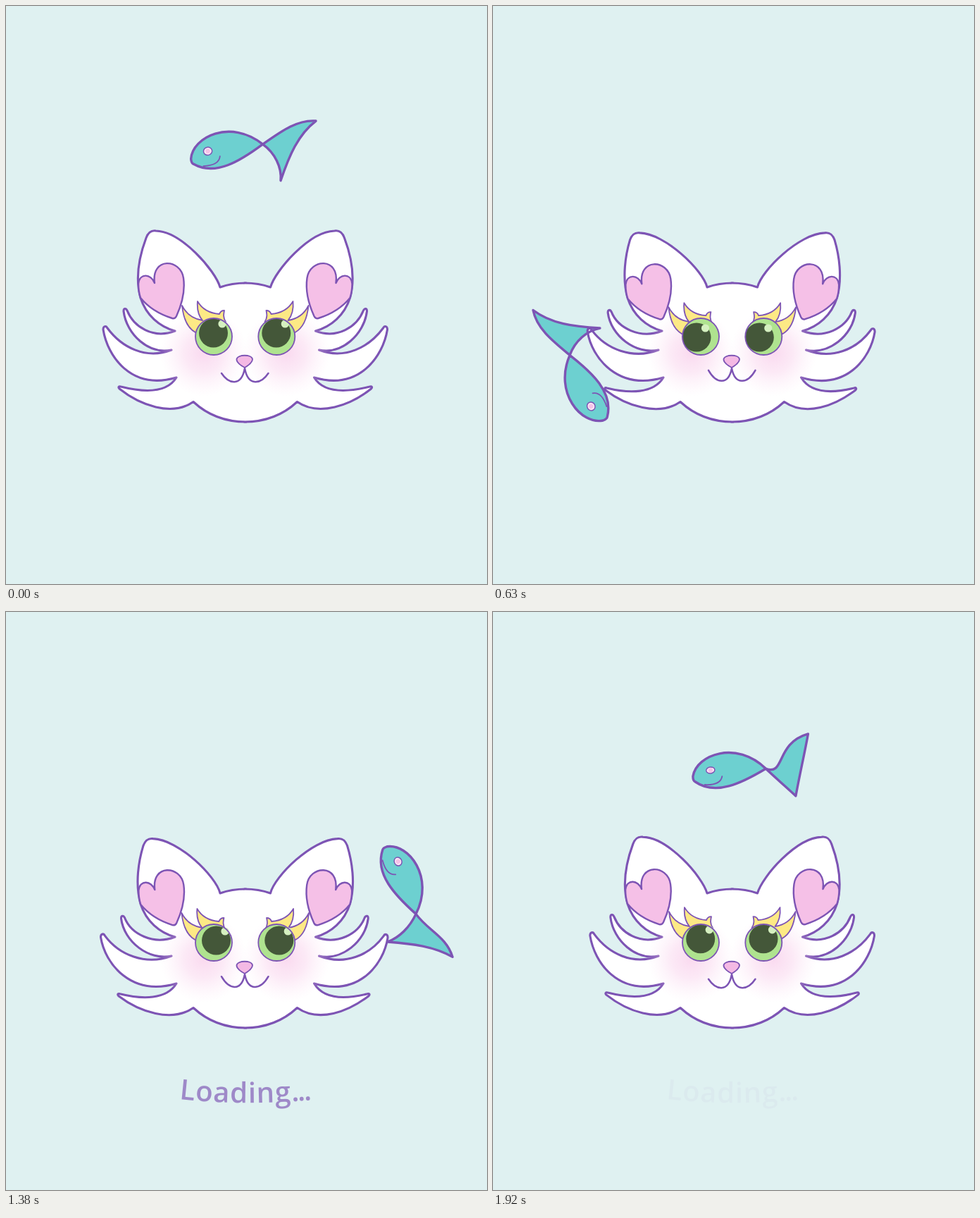
An HTML page for the animation above (1.95 s loop, 683x820 px).

```html
<!DOCTYPE html>
<html lang="en">
<head>
<meta charset="utf-8">
<title>Loading cat</title>
<style>
  html, body { margin: 0; width: 100%; height: 100%; overflow: hidden; background: #dff1f1; }
  svg { display: block; width: 100vw; height: 100vh; }
  .line { fill: none; stroke: #7d54b4; stroke-width: 3.4; stroke-linecap: round; stroke-linejoin: round; }
  .thin { stroke-width: 1.8; }
  .coat { fill: #fff; stroke-width: 3.1; }
  .heart { fill: #f5c0e7; stroke-width: 2.4; }
  .lash { fill: #fde985; }
  .teal { fill: #6dd0d0; }
  text { font: 600 40px "Open Sans", "Noto Sans", sans-serif; letter-spacing: 1px; fill: url(#reveal); }
  .dots { letter-spacing: -2px; }
</style>
</head>
<body>
<svg viewBox="0 0 683 820">
  <defs>
    <linearGradient id="reveal" gradientUnits="userSpaceOnUse" x1="0" y1="0" x2="75" y2="0">
      <stop offset="0" stop-color="#7d54b4"/>
      <stop offset="1" stop-color="#7d54b4" stop-opacity="0"/>
    </linearGradient>
    <radialGradient id="blush">
      <stop offset="0" stop-color="#f8cdea" stop-opacity=".75"/>
      <stop offset=".45" stop-color="#f9d4ed" stop-opacity=".5"/>
      <stop offset="1" stop-color="#fce6f5" stop-opacity="0"/>
    </radialGradient>
    <path id="baseline" d="M246 691Q343 702 455 690"/>
    <path id="body" d="M-52 -3C-43 -33 16 -46 52 0C15 16 -24 29 -50 5Q-53 3 -52 -3Z"/>
    <path id="tail"/>
    <path id="heart" d="M211 393C206 380 190 378 188 394C188 401 189 408 191 414C204 430 220 438 236 443Q240 444 242 440C252 418 254 400 252 386C248 358 206 356 211 393Z"/>
    <path id="lash" d="M250 425C252 445 258 457 269 463L312 448C308 442 309 437 310 432C307 432 304 434 303 437C290 436 279 431 272 419C271 430 274 440 279 446C266 444 256 437 250 425Z"/>
    <g id="eye">
      <circle cx="295" cy="469" r="26" fill="#afe38f"/>
      <g id="pupil">
        <circle cx="295" cy="469" r="20.5" fill="#445739"/>
        <circle cx="307.5" cy="456" r="5.6" fill="#d5f0c0"/>
      </g>
      <circle class="line thin" cx="295" cy="469" r="26"/>
    </g>
  </defs>

  <text id="label"><textPath href="#baseline">Loading<tspan class="dots">...</tspan></textPath></text>

  <g class="fish teal"><use href="#tail"/><use href="#body"/></g>

  <g id="cat">
    <path id="left" class="line coat"/>
    <path id="right" class="line coat" transform="translate(679.5) scale(-1 1)"/>
    <circle cx="281" cy="492" r="62" fill="url(#blush)"/>
    <circle cx="398" cy="492" r="62" fill="url(#blush)"/>
    <g class="line heart">
      <use class="ear" href="#heart"/>
      <g transform="translate(679.5) scale(-1 1)"><use class="ear" href="#heart"/></g>
    </g>
    <g class="line thin lash">
      <use class="brow" href="#lash"/>
      <g transform="translate(679.5) scale(-1 1)"><use class="brow" href="#lash"/></g>
    </g>
    <use href="#eye"/>
    <use href="#eye" x="89.3"/>
    <path id="mouth" class="line" style="stroke-width:2.5"/>
    <path class="line thin" style="fill:#f4b9e4" d="M339 513C333 510 327 505 327.5 501C329 494 349 494 350 501C350 505 344 510 339 513Z"/>
  </g>

  <g class="fish line">
    <use href="#tail"/><use href="#body"/>
    <path class="thin" d="M-11 2.6Q-15 15 -37 11"/>
    <ellipse id="fishEye" class="thin" cx="-26.2" cy="-8.3" rx="6.1" style="fill:#fdeaf7;stroke-width:1.5"/>
    <circle cx="-26.2" cy="-8.3" r="3.3" fill="#f6c3e8" stroke="none"/>
  </g>
</svg>

<script>
const LOOP = 1950, STEP = 30;
const $ = id => document.getElementById(id);
const all = sel => document.querySelectorAll(sel);
const clamp = v => Math.min(1, Math.max(0, v));

// time, angle round the cat, radius, heading
const swim = [
  [0, 7.4, 241, 13.2], [210, 40.8, 230, 43.4], [540, 96, 229, 99.5],
  [630, 114, 231, 118.7], [690, 129, 239, 133.8], [900, 193, 242.5, 200],
  [1080, 230, 240, 236], [1380, 287, 225, 294.9], [1620, 325.4, 227, 331],
  [1710, 334.7, 206, 340.9], [1920, 362.4, 218, 367.6]
];
// time, pupil offset
const gaze = [
  [0, -.5, -5], [210, -2.5, -4], [630, -6, 1], [900, 0, 6],
  [1130, 4.3, 1.8], [1380, 3.5, -3], [1710, 1, -6], [1950, -.5, -5]
];
const tailBent = "M52 0C82 -12 108 -23 133 -15C104 -2 85 24 65 56C71 38 66 16 52 0Z";
const tailOpen = "M52 0C78 14 70 -34 118 -41C109 -13 98 16 89 44C77 29 64 15 52 0Z";

// smooth curve through the keys
function track(keys, t) {
  let i = 0;
  while (i < keys.length - 2 && t >= keys[i + 1][0]) i++;
  const a = keys[i], b = keys[i + 1];
  const before = keys[i - 1] || a, after = keys[i + 2] || b;
  const span = b[0] - a[0], s = (t - a[0]) / span;
  return a.slice(1).map((v, n) => {
    const k = n + 1;
    const m0 = (b[k] - before[k]) / (b[0] - before[0]) * span;
    const m1 = (after[k] - v) / (after[0] - a[0]) * span;
    const d = b[k] - v;
    return v + s * (m0 + s * (3 * d - 2 * m0 - m1 + s * (m0 + m1 - 2 * d)));
  });
}

function mix(from, to, p) {
  const num = /-?[\d.]+/g, ends = to.match(num);
  let i = 0;
  return from.replace(num, v => +v + (ends[i++] - v) * p);
}

// half of the head; arguments shift the ear and the three whisker tips
function half(p, ...shifts) {
  const [[ex, ey], [ax, ay], [bx, by], [cx, cy]] = shifts.map(s => s.map(v => v * p));
  return `M341 393C328 393 315 395 304 399
    C${297 + ex * -.3} 375 ${249 + ex} ${320 + ey} ${213 + ex} ${319 + ey}
    C${206 + ex} ${318 + ey} ${202 + ex} ${321 + ey} ${199 + ex} ${329 + ey}
    C${190 + ex * .4} 353 183 385 191 414C199 439 218 455 240 461
    C209 473 ${181 + ax} ${455 + ay} ${172 + ax} ${432 + ay}
    C${170 + ax} ${428 + ay} ${167 + ax} ${429 + ay} ${167 + ax} ${433 + ay}
    C${171 + ax} ${466 + ay} 203 495 235 488
    C198 502 ${164 + bx} ${484 + by} ${144 + bx} ${457 + by}
    C${142 + bx} ${453 + by} ${138 + bx} ${454 + by} ${138 + bx} ${459 + by}
    C${144 + bx} ${497 + by} 178 546 242 527
    C228 550 ${195 + cx} ${548 + cy} ${163 + cx} ${540 + cy}
    C${160 + cx} ${539 + cy} ${159 + cx} ${541 + cy} ${161 + cx} ${543 + cy}
    C${190 + cx} ${566 + cy * .5} 235 583 266 561.5C287 581 312 590 341 590`;
}

function drawCat(t) {
  const p = 1 - Math.abs(2 * t / LOOP - 1);
  $("left").setAttribute("d", half(p, [-7, 4.5], [-6, 3], [-6, 4], [-2, 3]));
  $("right").setAttribute("d", half(p, [-7, 4.5], [-3, 3], [-1, 5], [6, 3]));
  all(".ear").forEach(e => e.setAttribute("transform", `translate(${.5 * p} ${1.9 * p})`));
  all(".brow").forEach(e => e.setAttribute("transform", `translate(${-p} ${3.4 * p})`));
  const end = 521 - 6.5 * p, dip = 539 - 2 * p;
  $("mouth").setAttribute("d",
    `M306 ${end}C316 ${dip - 3} 334 ${dip + 2} 339 514C344 ${dip + 2} 362.5 ${dip - 3} 372.5 ${end}`);
  $("pupil").setAttribute("transform", `translate(${track(gaze, t)})`);
}

function drawFish(t) {
  const [angle, r, heading] = track(swim, t);
  const a = angle * Math.PI / 180;
  const x = 345 - r * Math.sin(a), y = 447 - r * Math.cos(a);
  const open = clamp((t - 1300) / 320);
  all(".fish").forEach(f => f.setAttribute("transform", `translate(${x} ${y}) rotate(${-heading})`));
  $("tail").setAttribute("d", mix(tailBent, tailOpen, open));
  $("fishEye").setAttribute("ry", 5.6 - 1.1 * open);
}

function drawLabel(t) {
  $("reveal").setAttribute("gradientTransform", `translate(${255 + 1.05 * (t - 900)})`);
  $("label").setAttribute("opacity", clamp((LOOP - t) / 870));
}

function frame() {
  const t = Math.floor(performance.now() % LOOP / STEP) * STEP;
  drawCat(t);
  drawFish(t);
  drawLabel(t);
  requestAnimationFrame(frame);
}
frame();
</script>
</body>
</html>
```
